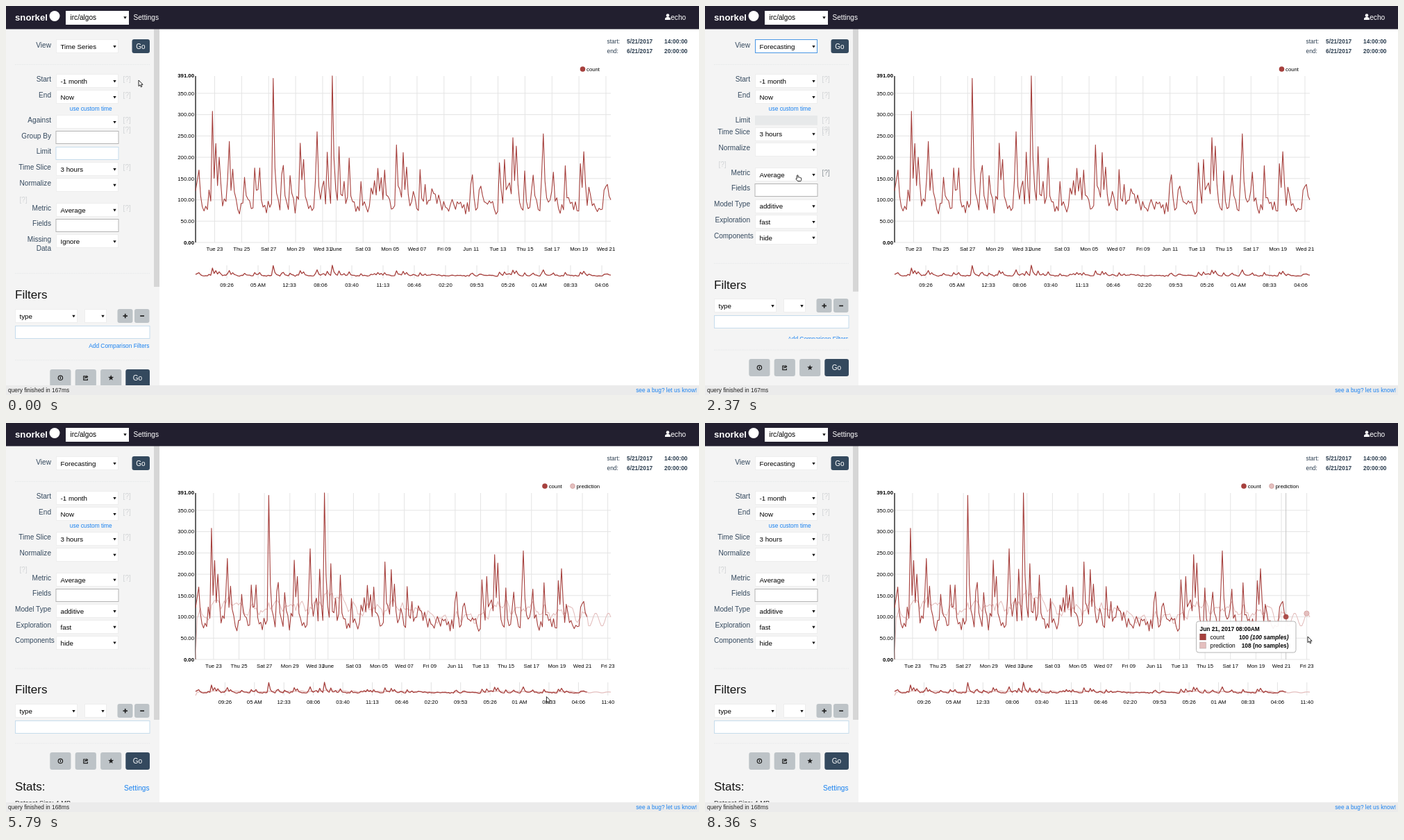
Write an HTML page that moves like this. It is 998x561 px and loops after 9.28 s.

```html
<!DOCTYPE html>
<html lang="en">
<head>
<meta charset="utf-8">
<title>Time series forecasting</title>
<style>
html, body { margin: 0; width: 998px; height: 561px; overflow: hidden; background: #fff; }
svg { display: block; }
text { font-family: "Liberation Sans", Arial, sans-serif; white-space: pre; }
</style>
</head>
<body>
<svg id="stage" width="998" height="561" viewBox="0 0 998 561">
  <defs><clipPath id="sideClip"><rect x="0" y="33" width="221" height="514"/></clipPath></defs>
  <rect width="998" height="561" fill="#fff"/>
  <g id="chartA"></g>
  <g id="chartB"></g>
  <g id="dates"></g>
  <rect id="pageBar" x="990" y="33" width="8" height="491" fill="#d6d6d6"/>
  <g id="side" clip-path="url(#sideClip)"></g>
  <g id="head"></g>
  <g id="foot"></g>
  <g id="over"></g>
</svg>
<script>
const LOOP = 9280, RED = '#a6403d', PINK = '#e4bfbe', NAVY = '#34495e', BLUE = '#1a82f0', GREY = '#bdc3c7';
const OPEN = 740, PICK = 2140, SWAP = 2240, GO = 3600, CLEAR = 3640, DONE = 4460, DRAWN = 4650, SETTLED = 4690;
const $ = id => document.getElementById(id);
const clamp = v => Math.max(0, Math.min(1, v));
const swing = v => .5 - Math.cos(clamp(v) * Math.PI) / 2;
const two = n => String(n).padStart(2, '0');

let seed = 11;
const rand = () => (seed = (seed * 16807) % 2147483647) / 2147483647;

// Markup helpers; text is placed by its vertical middle.
const text = (x, mid, s, size = 10, fill = '#000', more = '') =>
  `<text x="${x}" y="${mid + size * .35}" font-size="${size}" fill="${fill}" ${more}>${s}</text>`;
const rect = (x, y, w, h, fill, more = '') =>
  `<rect x="${x}" y="${y}" width="${w}" height="${h}" fill="${fill}" ${more}/>`;
const line = (x1, y1, x2, y2, stroke, w = 1, more = '') =>
  `<path d="M${x1},${y1}L${x2},${y2}" stroke="${stroke}" stroke-width="${w}" fill="none" ${more}/>`;
const dot = (x, y, r, fill, more = '') => `<circle cx="${x}" cy="${y}" r="${r}" fill="${fill}" ${more}/>`;
const END = 'text-anchor="end"', MID = 'text-anchor="middle"', BOLD = 'font-weight="bold"';

// ---- chart data: one sample per three hours ---------------------
const LEFT = 273, RIGHT = 871, TOP = 101, BASE = 341, UNIT = .6145;
const LAST = 246, AHEAD = 261, WIDE = (RIGHT - LEFT) / LAST, STEP = (RIGHT - LEFT) / AHEAD;
const spikes = { 2: 170, 10: 308, 12: 232, 14: 200, 20: 237, 22: 172, 35: 175, 38: 175, 46: 385, 52: 181, 62: 233, 64: 195,
  72: 260, 78: 212, 81: 391, 85: 225, 91: 198, 108: 174, 112: 170, 119: 229, 123: 211, 125: 177, 133: 171, 164: 159,
  180: 187, 183: 195, 188: 246, 190: 226, 195: 168, 200: 158, 206: 255, 212: 165, 219: 180, 228: 185, 230: 213 };

// Quiet base with small bumps; tall spikes drop off over the next samples.
const count = [];
for (let i = 0, carry = 0; i <= LAST; i++) {
  const calm = i > 140 && i < 163 ? .35 : 1;
  const bump = rand() < .2 ? (25 + 50 * rand()) * calm : 0;
  carry = Math.max(carry * .42, bump);
  count.push(spikes[i] || 64 + 32 * rand() + carry);
  if (spikes[i]) carry = (spikes[i] - 80) * .8;
}
count[LAST] = 100;

// The prediction is a running average with a daily wave, which alone goes on past the data.
const prediction = [];
for (let i = 0, mean = 95; i <= AHEAD; i++) {
  const wave = Math.cos((i - 259.5) * Math.PI / 4);
  if (i <= LAST) mean += (count[i] - mean) * .085;
  prediction.push(i > LAST ? 93.5 + 15.7 * wave : i ? mean + 9 * wave + 16 * (rand() - .5) : 0);
}

const yOf = v => BASE - v * UNIT;
const mini = v => 393 - v * .0486;
const path = (data, step, color, w, map) =>
  `<path d="M${data.map((v, i) => (LEFT + i * step).toFixed(1) + ',' + map(v).toFixed(1)).join('L')}" fill="none" stroke="${color}" stroke-width="${w}" stroke-linejoin="round"/>`;

function chart(step, lines, lastDay, clocks) {
  const sx = x => LEFT + (x - LEFT) * step / WIDE;
  const tick = (y, s, bold) => text(271, y, s, 7.75, '#000', END + ' ' + (bold ? BOLD : ''));
  const week = ['Jun', 'Mon', 'Tue', 'Wed', 'Thu', 'Fri', 'Sat'];
  let s = tick(TOP - .5, '391.00', true);
  for (let v = 0; v <= 350; v += 50) s += line(LEFT, yOf(v), RIGHT, yOf(v), '#e4e4e4') + tick(yOf(v), v.toFixed(2), !v);
  for (let d = 0; d <= lastDay; d += d === 8 ? 1 : 2) {
    const x = sx(300.5 + d * 19.43), date = d < 9 ? 23 + d : d - 8;
    s += line(x, TOP, x, BASE, '#e4e4e4') + text(x, 350.5, date === 1 ? 'June' : week[(d + 2) % 7] + ' ' + two(date), 7.75, '#000', MID);
  }
  for (let i = 0; i < clocks; i++) {
    const x = sx(318 + i * 45), min = Math.floor((1700 + 3520 * i) / 3), h = two(Math.floor(min / 60) % 12 || 12);
    s += line(x, 374, x, 393, '#e2e2e2') + text(x, 402.5, min % 60 ? h + ':' + two(min % 60) : h + ' AM', 7.75, '#000', MID);
  }
  s += line(LEFT, TOP, LEFT, BASE, '#222', 1.4);
  lines.forEach(([data, color]) => s += path(data, step, color, 1.1, yOf) + path(data, step, color, 1.3, mini));
  return s;
}
$('chartA').innerHTML = chart(WIDE, [[count, RED]], 29, 13) + dot(830.5, 91, 3.8, RED) + text(836, 91.3, 'count', 7.75);
$('chartB').innerHTML = chart(STEP, [[prediction, PINK], [count, RED]], 31, 14) +
  dot(776, 91, 3.8, RED) + text(781.7, 91.3, 'count', 7.75) +
  dot(816, 91, 3.4, PINK, 'stroke="#d3a3a1" stroke-width=".8"') + text(821.5, 91.3, 'prediction', 7.75);

// ---- fixed page parts -------------------------------------------
const box = (x, y, w, h, stroke) => rect(x + .5, Math.round(y) + .5, w - 1, h - 1, '#fff', `stroke="${stroke}"`);
const arrow = (x, y) => `<path d="M${x - 2.2},${y - 1.6}h4.4l-2.2,3.6z" fill="#111"/>`;
const select = (x, y, w, s = '', stroke = '#eee', size = 9.75) =>
  box(x, y - 10, w, 20, stroke) + text(x + 6.5, y + .3, s, size) + arrow(x + w - 5.5, y + .3);
const button = (x, y, w, h, fill) => rect(x, Math.round(y - h / 2), w, h, fill, 'rx="3"');
const divider = y => line(13, y, 207, y, '#e6e8e9', 1, 'stroke-dasharray="1.5 1"');

$('head').innerHTML = rect(0, 0, 998, 33.4, '#221f2f') + text(13, 16, 'snorkel', 13.2, '#fff', BOLD) + dot(70, 14.5, 7.5, '#fff') +
  select(86, 16.5, 91, 'irc/algos', '#fff', 10.1) + text(183.5, 16.3, 'Settings', 10.1, '#fff') +
  dot(953, 13.6, 2.3, '#fff') + '<path d="M949,20v-1.5q0-2 2.6-2.6h2.8q2.6.6 2.6 2.6v1.5z" fill="#fff"/>' +
  text(957.2, 16.3, 'echo', 10.2, '#fff');
$('dates').innerHTML = [['start:', '5/21/2017', '14:00:00', 51.5], ['end:', '6/21/2017', '20:00:00', 65]].map(([a, b, c, y]) =>
  text(865.5, y, a, 8.37, '#2c3e50') + text(894, y, b, 8.37, '#2c3e50', BOLD) + text(948, y, c, 8.37, '#2c3e50', BOLD)).join('');
$('foot').innerHTML = rect(0, 547, 998, 14, '#ebebeb') +
  text(3, 554.2, 'query finished in <tspan id="ms">167</tspan>ms', 8.35, '#222') +
  text(995, 554, 'see a bug? let us know!', 8.37, BLUE, END);

// ---- sidebar ----------------------------------------------------
const star = (x, y) => `<path d="M${Array.from({ length: 10 }, (_, i) => {
  const r = i % 2 ? 1.8 : 4.2, a = i * Math.PI / 5;
  return (x + r * Math.sin(a)).toFixed(2) + ',' + (y - r * Math.cos(a)).toFixed(2);
}).join('L')}z" fill="#222"/>`;
const icons = [
  (x, y) => dot(x, y, 3.2, 'none', 'stroke="#222" stroke-width="1.2"') + line(x, y - 1.8, x, y + 1.6, '#222', 1.2),
  (x, y) => `<path d="M${x},${y - 2.5}h-3v5.6h5.6v-2M${x - 1},${y + 1}q0-2.6 3-2.6m-1.2-1.8l2,1.8l-2,1.8" fill="none" stroke="#222" stroke-width="1.2"/>`,
  star];

// Rows: label, kind (select, input, pale input), value, help mark.
const oldRows = [['Against', 's', '', 1], ['Group By', 'i'], ['Limit', 'p'], ['Time Slice', 's', '3 hours', 1], ['Normalize', 's'],
  ['Metric', 's', 'Average', 1], ['Fields', 'i'], ['Missing', 's', 'Ignore']];
const newRows = [['Time Slice', 's', '3 hours', 1], ['Normalize', 's'], ['Metric', 's', 'Average', 1], ['Fields', 'i'],
  ['Model Type', 's', 'additive'], ['Exploration', 's', 'fast'], ['Components', 's', 'hide']];
const PITCH = 22.7;

function sidebar(t, cx, cy) {
  const swapped = t >= SWAP;
  const lim = swapped ? PITCH * (1 - swing((t - SWAP) / 400)) : 0;
  const link = 17 * (1 - swing((t - 2350) / 400));
  const free = t < OPEN || t >= PICK;
  const help = (y, x = 174.2) => text(x, y, '[?]', 10.1, free && cx < 170 && Math.abs(cy - y) < 10 ? '#8d949a' : '#d2d4d6', MID);
  const label = (y, s) => s === 'Components' ? text(13, y, s, 10, NAVY) : text(65, y, s, 10.1, NAVY, END);
  const row = (y, [name, kind, val, q]) => label(y, name) + (q ? help(y + .3) : '') +
    (kind === 's' ? select(72, y + 3, 90, val) : box(71.5, y - 7, 91, 19, kind === 'i' ? '#b4b4b4' : '#c6dcec'));

  let s = rect(0, 33, 221, 514, '#f4f4f4') + rect(213, 33, 8, (swapped ? 428 - lim * .94 : 405) - 33, '#d6d6d6');
  s += label(56, 'View') + select(72, 58.3, 90, t < PICK ? 'Time Series' : 'Forecasting', t >= OPEN && t < GO ? '#4a97e4' : '#eee');
  s += button(181.5, 58.3, 25.5, 20, NAVY) + text(194, 58.6, 'Go', 10, '#fff', MID) + divider(84.5);
  s += row(105.3, ['Start', 's', '-1 month', 1]) + row(128.2, ['End', 's', 'Now', 1]);
  s += text(122.3, 148, 'use custom time', 8.37, BLUE, MID);

  if (lim > .5) s += `<svg x="0" y="156" width="213" height="${lim}">` + label(8.5, 'Limit') +
    rect(72, 2, 90, Math.max(0, lim - 3.5), '#e7e9ea') + help(8.5) + '</svg>' + help(161 + lim);
  if (!swapped) s += help(178);

  let y = 164.3 + lim;
  (swapped ? newRows : oldRows).forEach(r => {
    s += row(y, r);
    if (r[0] === 'Normalize') { s += help(y + 24, 25); y += 13.3; }
    if (r[0] === 'Missing') s += label(y + 13, 'Data');
    y += PITCH;
  });

  const f = swapped ? 384.5 + lim : 416.3, g = f + 30.7;
  s += divider(f - 30.5) + text(13, f, 'Filters', 17.1, '#111');
  s += select(13, g, 90, 'type') + select(113, g, 32) + button(160.5, g, 22, 20, GREY) + button(185, g, 21.5, 20, GREY);
  s += line(168.5, g, 175, g, '#222', 1.7) + line(171.7, g - 3.2, 171.7, g + 3.2, '#222', 1.7) + line(193.2, g, 199, g, '#222', 1.7);
  s += box(13, f + 44.5, 194.5, 19, '#c6dcec');
  if (link > .5) {
    const sunk = swapped ? 4 : 0;
    s += `<svg x="0" y="${f + 64}" width="213" height="${sunk ? Math.max(0, link - 2.5) : 17}">` +
      text(206.5, 10.2 + sunk, 'Add Comparison Filters', 8.37, BLUE, END) + '</svg>';
  }
  s += divider(f + 77.5 + link);
  const b = f + 103 + link;
  icons.forEach((icon, i) => { const x = 63.3 + i * 36.4; s += button(x, b, 30.2, 25, GREY) + icon(x + 15.1, b); });
  s += button(172.3, b, 34.7, 25, NAVY) + text(189.5, b + .2, 'Go', 10.1, '#fff', MID);
  s += text(13, b + 36.5, 'Stats:', 17, '#111') + text(206.5, b + 38.7, 'Settings', 10.1, BLUE, END);
  return s + text(13, b + 60, 'Dataset Size: 4 MB', 9.4, '#222');
}

// ---- moving overlay ---------------------------------------------
// Pointer gestures: start, end, and where they lead.
const gestures = [
  [50, 570, 153, 65], [740, 1200, 140, 131], [1200, 1640, 136, 236], [1680, 1970, 134, 244], [2400, 3040, 217, 128],
  [3080, 3440, 193, 56], [3600, 4500, 238, 118], [4840, 5400, 600, 338], [5400, 5790, 778, 395], [5790, 5950, 838, 338],
  [5950, 6350, 981, 305], [6350, 6690, 870, 308], [6730, 7050, 848, 307], [7050, 7630, 870, 308], [7670, 7900, 884, 309], [7900, 8360, 868, 308]];
function pointerAt(t) {
  let x = 191, y = 107;
  for (const [from, to, tx, ty] of gestures) {
    const u = clamp((t - from) / (to - from));
    x += (tx - x) * u;
    y += (ty - y) * u;
  }
  return [x, y];
}
function cursor(x, y, hand) {
  const d = hand
    ? 'M-1.6,4.8V.8q0-.9.9-.9t.9.9V3q1-.5 1.6.2 1-.4 1.5.4 1.4-.2 1.4 1V6.4q0 1.2-.8 2.2H-.4L-3,5.6q-.3-1.2 1.4-.8z'
    : 'M0,0V8.6L2,6.8 3.4,9.9 4.8,9.2 3.5,6.3H6.1z';
  return `<path transform="translate(${x},${y})" d="${d}" fill="#fff" stroke="#111" stroke-width=".9" stroke-linejoin="round"/>`;
}

const views = ['Table', 'Time Series', 'Distribution', 'Samples', 'Timeline', 'Overview', '--', 'Bar Chart', 'Stacked Area',
  'Scatter Plot', 'Grouped Dist.', 'DiGraph', '--', 'Impact Attr.', 'Forecasting', 'WECO Alerts'];
function menu(cy) {
  const pitch = 12.37, top = 68.5;
  let on = cy < top ? 1 : Math.floor((cy - top) / pitch);
  if (views[on] === '--') on--;
  return box(71.5, top, 91, 199, '#5a9fe0') + views.map((v, i) => {
    const y = top + pitch * i;
    return (i === on ? rect(72, y, 90, pitch, '#0f86fa') : '') + text(78.8, y + 6.3, v, 9.75, i === on ? '#fff' : '#000');
  }).join('');
}

function stamp(stepsBack) {
  const d = new Date(Date.UTC(2017, 5, 21, 8) - stepsBack * 108e5), h = d.getUTCHours();
  return `${d.getUTCMonth() === 4 ? 'May' : 'Jun'} ${two(d.getUTCDate())}, 2017 ${two(h % 12 || 12)}:00${h < 12 ? 'AM' : 'PM'}`;
}
function tooltip(cx, cy) {
  const j = Math.floor((cx - LEFT) / STEP), i = Math.min(j, LAST), gx = LEFT + i * STEP;
  const n = Math.round(count[i]);
  const x = cx + 165 < 998 ? cx + 17 : cx - 160.5, y = cy - 22;
  const entry = (mid, color, name, s) => rect(x + 5, mid - 4.7, 9, 9, color, 'stroke="#000" stroke-opacity=".2" stroke-width=".7"') +
    text(x + 20, mid, name, 8.37) + text(x + 133, mid, s, 8.37, '#000', END + ' ' + BOLD);
  return line(gx, TOP, gx, BASE, '#c4c4c4') +
    dot(gx, yOf(count[i]), 3.8, RED, 'opacity=".9"') + dot(LEFT + j * STEP, yOf(prediction[j]), 3.6, PINK, 'stroke="#d9aaa8"') +
    rect(x, y, 143.5, 45, '#fff', 'fill-opacity=".94" stroke="#b5b5b5" rx="3.5"') +
    text(x + 5, y + 10.8, stamp(LAST - i), 8.35, '#000', BOLD) +
    entry(y + 22.7, RED, 'count', `${n} <tspan font-style="italic">(${n} samples)</tspan>`) +
    entry(y + 34.8, PINK, 'prediction', `${Math.round(prediction[j])} (no samples)`);
}

const show = (id, on) => $(id).setAttribute('visibility', on ? 'visible' : 'hidden');
let lastSide = '';
function render(t) {
  const [x, y] = pointerAt(t), within = (a, b) => t >= a && t < b;
  show('chartA', t < CLEAR);
  show('chartB', t >= DRAWN);
  show('pageBar', within(DONE, SETTLED));
  $('dates').setAttribute('transform', `translate(${within(DONE, SETTLED) ? -8 : 0},0)`);
  $('ms').textContent = t < DONE ? 167 : 168;
  const side = sidebar(t, x, y);
  if (side !== lastSide) $('side').innerHTML = lastSide = side;
  const inChart = t >= DRAWN && x >= LEFT && x <= RIGHT && y >= TOP && y <= BASE;
  const hand = within(530, OPEN) || within(PICK, 2560) || within(3380, 3750);
  $('over').innerHTML = (within(OPEN, PICK) ? menu(y) : '') + (inChart ? tooltip(x, y) : '') + cursor(x, y, hand);
}
const start = performance.now();
function tick() {
  render((performance.now() - start) % LOOP);
  requestAnimationFrame(tick);
}
render(0);
requestAnimationFrame(tick);
</script>
</body>
</html>
```
